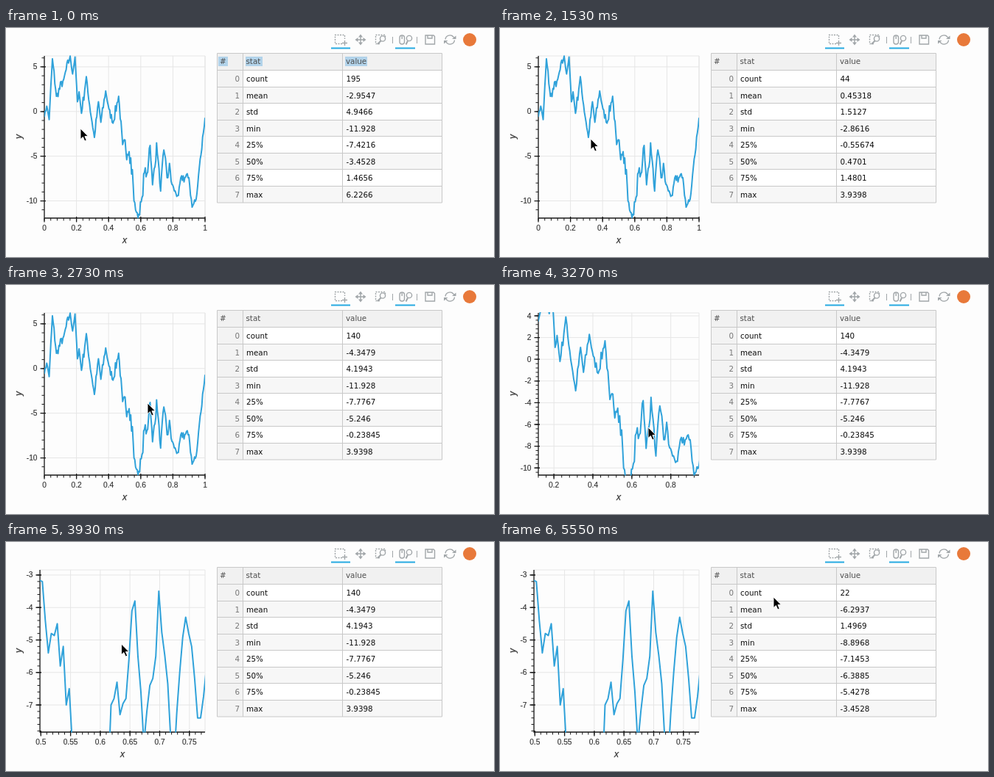
Write an HTML page that moves like this. It is 662x312 px and loops after 5.58 s.

```html
<!DOCTYPE html>
<html lang="en">
<head>
<meta charset="utf-8">
<title>Linked selection table</title>
<style>
  html, body { margin: 0; width: 100%; height: 100%; overflow: hidden; background: #fdfdfd; }
  svg { display: block; width: 662px; height: 312px; }
  .tick { font: 10.2px "Liberation Sans", Arial, sans-serif; fill: #333; stroke: #333; stroke-width: .15; }
  .label { font: italic 12px "Liberation Sans", Arial, sans-serif; fill: #333; stroke: #333; stroke-width: .25; text-anchor: middle; }
  .cell { font: 10.3px "DejaVu Sans", Verdana, sans-serif; fill: #0c0c0c; }
  .head { fill: #4c4c4c; }
  .index { fill: #777; text-anchor: end; }
  .grid { stroke: #e6e6e6; fill: none; }
  .axis { stroke: #1a1a1a; stroke-width: 1.3; fill: none; }
  .minor { stroke: #1a1a1a; fill: none; }
  .curve { stroke: #30a2da; stroke-width: 2; fill: none; stroke-linejoin: round; }
  .rule { stroke: #c8c8c8; fill: none; }
  .icon { stroke: #a1a6a9; stroke-width: 1.4; fill: none; }
  .solid { fill: #a1a6a9; stroke: none; }
  .active { stroke: #26aae1; stroke-width: 2; }
</style>
</head>
<body>
<svg viewBox="0 0 662 312">
  <defs><clipPath id="clip"><rect id="clipBox" y="37" height="222.5"/></clipPath></defs>

  <g class="icon">
    <path stroke-dasharray="2 1.5" d="M456 21.500H446.500V9.500H459.500V15"/>
    <path d="M456 20.500h7M459.500 17v7"/>
    <path d="M476 16h10M481 11v10"/>
    <path class="solid" d="M473.500 16l4-3v6zM488.500 16l-4-3v6zM481 8.500l-3 4h6zM481 23.500l-3-4h6z"/>
    <path stroke-dasharray="2 1.5" d="M507 21.500H501.500V9.500H514.500V13"/>
    <circle cx="511" cy="14.500" r="3.600"/><path stroke-width="2" d="M508.500 17.500l-4.500 4.500"/>
    <path stroke-width="1" d="M524.500 12v9M557.500 12v9"/>
    <rect x="534" y="10" width="6.500" height="12" rx="3.200"/><path d="M537.200 11v4"/>
    <circle cx="547" cy="14" r="3.600"/><path stroke-width="2" d="M545 17.500l-2.500 5"/>
    <path d="M569 10h11l1.500 1.500v10.500h-12.500zM572 10.500v3.500h6v-3.500"/>
    <path d="M596 15.500a6.200 6.200 0 0 1 11.500-2.500M608.500 16.500a6.200 6.200 0 0 1-11.500 2.500"/>
    <path class="solid" d="M605 15h5.500v-4.500zM599.500 17h-5.500v4.500z"/>
  </g>
  <path class="active" d="M441 27.500h26M528 27.500h27"/>
  <circle cx="629" cy="16" r="9" fill="#e8793a"/>

  <g id="plot"></g>
  <g clip-path="url(#clip)">
    <path id="curve" class="curve"/>
    <rect id="box" y="38" height="220.500" fill="#d3d3d3" fill-opacity=".6" stroke="#555" stroke-width="1.700" stroke-dasharray="6 4"/>
  </g>
  <g id="table"></g>
  <path id="cursor" d="M0 0V14.500L3.400 11.500L5.800 17L8.200 16L5.900 10.600H10.400Z" stroke="#fff" stroke-width=".9"/>
</svg>

<script>
const LOOP = 5580, STEP = 30, COUNT = 200;
const RIGHT = 270, TOP = 38, BOTTOM = 259;
const $ = id => document.getElementById(id);

// Turning points of the walk: index, value.
const turns = [
  [0, -.6], [3, .6], [6, -.9], [10, 5.9], [15, 1.7], [24, 3.6], [32, 6.2], [35, 4.2], [38, 6.1],
  [41, 1.1], [43, 2.2], [46, -.2], [52, 3.9], [54, 2.1], [62, -2.9], [67, 1.1], [70, -1.2],
  [76, 2.3], [80, .3], [85, -1.3], [92, 1.7], [97, -3.7], [100, -3.2], [102, -5.4], [103, -4.8],
  [105, -4.5], [106, -5.8], [107, -5.2], [108, -7], [109, -6.5], [111, -10], [116, -11.9],
  [122, -9.4], [123, -7], [125, -6.3], [126, -7.3], [128, -6.8], [130, -4.1], [131, -3.8],
  [134, -8.2], [136, -6.4], [138, -5.5], [139, -3.5], [144, -8.9], [146, -6], [148, -4.3],
  [150, -5.2], [152, -7.4], [153, -7.4], [155, -5.8], [157, -7.8], [161, -8.9], [166, -9.4],
  [169, -7.4], [179, -7.4], [183, -10.7], [188, -9.8], [192, -6.2], [199, -.7]
];
// Pointer stops: time, x, y.
const moves = [
  [150, 101, 137], [1020, 149, 151], [1530, 123, 151], [1710, 104, 150], [2370, 257, 166],
  [2730, 192, 161], [3270, 201, 194], [3720, 201, 194], [3930, 156.5, 139], [4110, 147, 126],
  [4530, 208.5, 96], [4800, 237.5, 88], [5550, 371, 75]
];
// Visible range: time, x0, x1, y0, y1.
const views = [
  [2850, 0, 1, -11.928, 6.2266],
  [3270, .12, .945, -10.66, 4.27],
  [3720, .4984, .7763, -7.836, -2.842]
];
const names = ["count", "mean", "std", "min", "25%", "50%", "75%", "max"];
const initial = "195 -2.9547 4.9466 -11.928 -7.4216 -3.4528 1.4656 6.2266";
const drags = [
  { down: 150, up: 1020, stats: "44 0.45318 1.5127 -2.8616 -0.55674 0.4701 1.4801 3.9398" },
  { down: 1710, up: 2370, stats: "140 -4.3479 4.1943 -11.928 -7.7767 -5.246 -0.23845 3.9398" },
  { down: 4110, up: 4800, stats: "22 -6.2937 1.4969 -8.8968 -7.1453 -6.3885 -5.4278 -3.4528" }
];

const linear = p => p;
const smooth = p => p * p * (3 - 2 * p);
// Even wheel steps shrink the span by a constant ratio.
const wheel = (p, a, b) => {
  const r = (b[2] - b[1]) / (a[2] - a[1]);
  return (1 - r ** p) / (1 - r);
};
function sample(keys, t, ease) {
  const n = keys.findIndex(k => k[0] > t);
  if (n < 1) return (n ? keys.at(-1) : keys[0]).slice(1);
  const a = keys[n - 1], b = keys[n];
  const p = ease((t - a[0]) / (b[0] - a[0]), a, b);
  return a.slice(1).map((v, i) => v + (b[i + 1] - v) * p);
}

let seed = 7;
const random = () => (seed = seed * 16807 % 2147483647) / 2147483647;
// Noise grows with the distance to the nearest turning point.
const data = Array.from({ length: COUNT }, (_, i) => {
  const gap = Math.min(...turns.map(k => Math.abs(k[0] - i)));
  const noise = (random() - .5) * Math.min(1.3, gap * .5);
  return [i / (COUNT - 1), sample(turns, i, linear)[0] + noise];
});

function interval(span) {
  const base = 10 ** Math.floor(Math.log10(span / 6));
  const miss = v => Math.abs(6 - span / v);
  return [1, 2, 5, 10].map(m => m * base).reduce((a, b) => miss(b) < miss(a) ? b : a);
}
function ticks(lo, hi, step) {
  const out = [];
  for (let n = Math.ceil(lo / step - 1e-6); n * step <= hi + step * 1e-6; n++) out.push(n * step);
  return out;
}
const format = v => String(+v.toFixed(4) || 0);
const text = (cls, x, y, s, extra = "") => `<text class="${cls}" x="${x}" y="${y}" ${extra}>${s}</text>`;
const path = (cls, d) => `<path class="${cls}" d="${d}"/>`;
const rect = (x, y, w, h, fill) => `<rect x="${x}" y="${y}" width="${w}" height="${h}" fill="${fill}"/>`;
const each = (list, f) => list.map(f).join("");
const textWidth = s => [...s].reduce((w, c) => w + (c === "-" ? 3.33 : c === "." ? 2.78 : 5.56), 0);

function drawPlot([x0, x1, y0, y1]) {
  const sx = interval(x1 - x0), sy = interval(y1 - y0);
  const xs = ticks(x0, x1, sx), ys = ticks(y0, y1, sy);
  const left = Math.round(37.3 + Math.max(...ys.map(v => textWidth(format(v)))));
  const px = v => +(left + (v - x0) / (x1 - x0) * (RIGHT - left)).toFixed(2);
  const py = v => +(BOTTOM - (v - y0) / (y1 - y0) * (BOTTOM - TOP)).toFixed(2);

  $("plot").innerHTML =
    path("grid", each(xs, v => `M${px(v)} ${TOP}V${BOTTOM}`) + each(ys, v => `M${left} ${py(v)}H${RIGHT}`)
      + `M${left} ${TOP}H${RIGHT}V${BOTTOM}`) +
    path("axis", `M${left} ${TOP}V${BOTTOM}H${RIGHT}`
      + each(xs, v => `M${px(v)} ${BOTTOM - 2}v7.5`) + each(ys, v => `M${left + 2} ${py(v)}h-7.5`)) +
    path("minor", each(ticks(x0, x1, sx / 5), v => `M${px(v)} ${BOTTOM}v3.5`)
      + each(ticks(y0, y1, sy / 5), v => `M${left} ${py(v)}h-3.5`)) +
    each(xs, v => text("tick", px(v), 275.5, format(v), 'text-anchor="middle"')) +
    each(ys, v => text("tick", left - 9.5, py(v) + 3.5, format(v), 'text-anchor="end"')) +
    text("label", (left + RIGHT) / 2, 293, "x") +
    text("label", 0, 0, "y", 'transform="translate(21 148) rotate(-90)"');

  $("curve").setAttribute("d", "M" + data.map(([x, y]) => px(x) + " " + py(y)).join("L"));
  $("clipBox").setAttribute("x", left);
  $("clipBox").setAttribute("width", RIGHT - left);
}

function buildTable() {
  const pitch = 22.55, rowY = i => 57.5 + i * pitch;
  $("table").innerHTML =
    rect(286.5, 34.5, 305, 23, "#f1f1f1") + rect(286.5, 57.5, 35, 180.5, "#f3f3f3") +
    each(names, (_, i) => rect(322, rowY(i), 269.5, pitch, i % 2 ? "#f7f7f7" : "#fff")) +
    path("rule", "M286.500 34.500H591.500V238H286.500ZM321.500 34.500V238M456.500 34.500V238"
      + each(names, (_, i) => `M286.500 ${Math.floor(rowY(i)) + .5}H591.500`)) +
    `<g id="marked">${rect(288, 39, 13, 13, "#b2d3ea") + rect(325, 39, 23, 13, "#b2d3ea") + rect(460, 39, 30, 13, "#b2d3ea")}</g>` +
    text("cell head", 290, 49, "#") + text("cell head", 325.5, 49, "stat") + text("cell head", 461, 49, "value") +
    each(names, (s, i) => {
      const y = rowY(i) + 15.5;
      return text("cell index", 317, y, i) + text("cell", 326, y, s) + text("cell value", 461.5, y, "");
    });
}

buildTable();
const values = document.querySelectorAll(".value");
let shownView = "", shownStats = "";

function draw(t) {
  const view = sample(views, t, wheel);
  if (String(view) !== shownView) {
    shownView = String(view);
    drawPlot(view);
  }
  const stats = drags.findLast(d => d.up <= t)?.stats ?? initial;
  if (stats !== shownStats) {
    shownStats = stats;
    stats.split(" ").forEach((s, i) => values[i].textContent = s);
  }
  const [x, y] = sample(moves, t, smooth);
  $("cursor").setAttribute("transform", `translate(${x} ${y})`);
  $("marked").style.display = t < drags[0].down ? "" : "none";

  const drag = drags.find(d => t > d.down && t < d.up);
  $("box").style.display = drag ? "" : "none";
  if (drag) {
    const from = sample(moves, drag.down, smooth)[0];
    $("box").setAttribute("x", from);
    $("box").setAttribute("width", Math.max(0, x - from));
  }
}

const start = performance.now();
function tick() {
  const t = (performance.now() - start) % LOOP;
  draw(Math.floor(t / STEP) * STEP);
  requestAnimationFrame(tick);
}
tick();
</script>
</body>
</html>
```
